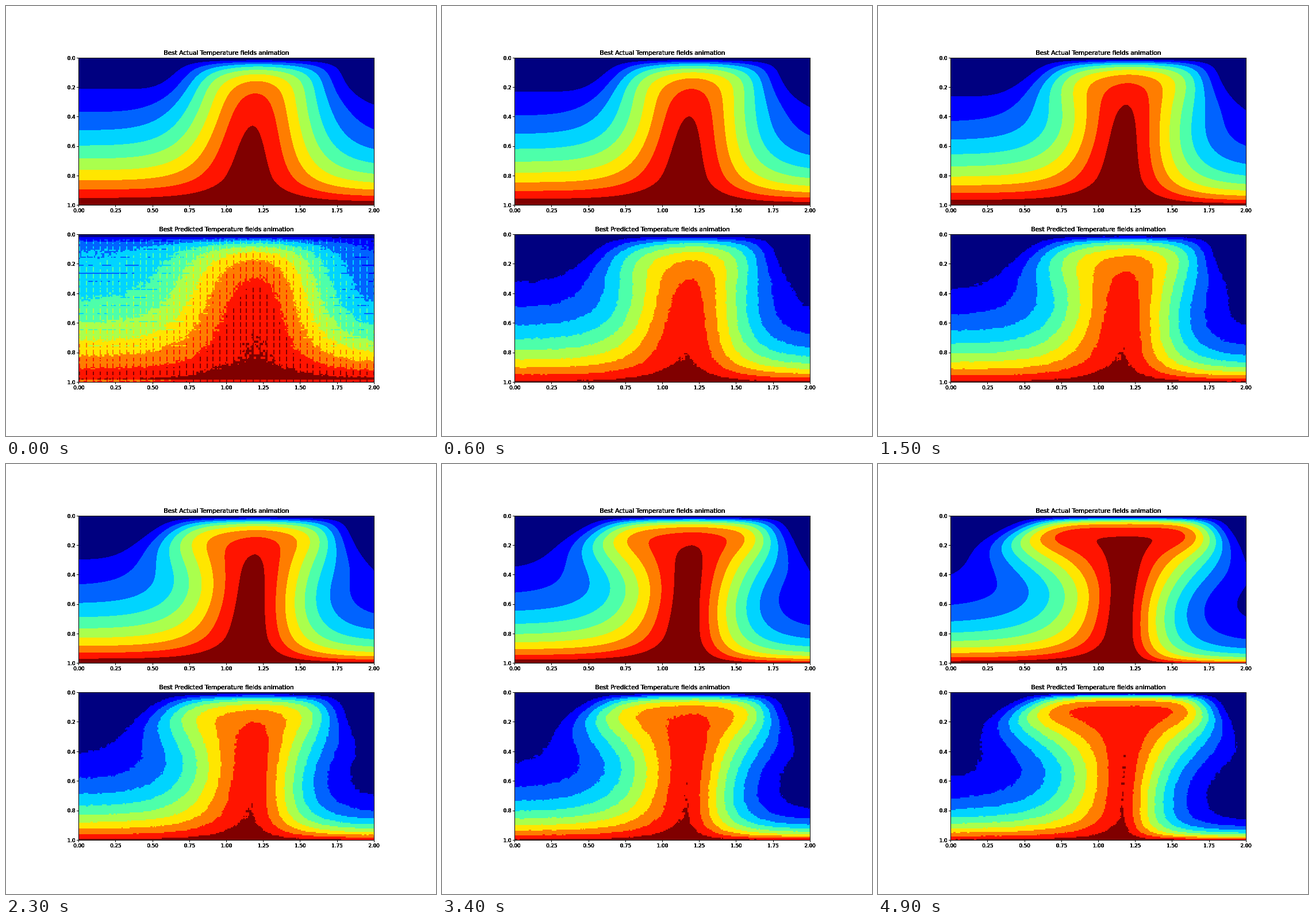
Animation of 748 by 748 pixels, one loop 5000 ms. Source, as an HTML page with a canvas:

```html
<!DOCTYPE html>
<html lang="en">
<head>
<meta charset="utf-8">
<title>Temperature fields</title>
<style>
html, body { margin: 0; width: 100%; height: 100%; overflow: hidden; background: #fff; }
canvas { display: block; }
</style>
</head>
<body>
<canvas id="stage" width="748" height="748"></canvas>
<script>
const LOOP = 5000, STEP = 100, LAST = LOOP - STEP;
const LEFT = 126.5, WIDTH = 514, UNIT = 256.7;
const COLORS = ['#000080', '#0000ff', '#0063ff', '#00d4ff', '#4dffaa',
  '#aaff4d', '#ffe600', '#ff7d00', '#ff1400', '#800000'];
const RGB = COLORS.map(c => [1, 3, 5].map(i => parseInt(c.slice(i, i + 2), 16)));

const ctx = document.getElementById('stage').getContext('2d');

// Pairs give the value at the start and at the end of the loop:
// skin and rise shape the plume axis, decay and bend the two side walls,
// width, flare and spread the mushroom outline.
const actual = {
  title: 'Best Actual Temperature fields animation',
  y: 90.5, h: 256, cell: 1, hot: 1, cap: () => 1,
  skin: [.078, .029], rise: [1.24, 1.42],
  left: { decay: [1.6, 3.4], bend: [1, .86], width: [.413, .413], flare: [.02, .4], spread: .22 },
  right: { decay: [2.9, 5.36], bend: [.95, .64], width: [.456, .33], flare: [0, .29], spread: .28 }
};
const predicted = {
  title: 'Best Predicted Temperature fields animation',
  y: 397.5, h: 257, cell: 2, hot: .92, cap: s => .9 + .062 * Math.exp(-2.45 * s),
  skin: [.084, .026], rise: [1.15, 1.6],
  left: { decay: [2.24, 5.5], bend: [1, 1], width: [.43, .42], flare: [.09, .37], spread: .22 },
  right: { decay: [4.12, 17], bend: [1, 1], width: [.425, .31], flare: [.02, .27], spread: .28 }
};

for (const p of [actual, predicted]) {
  p.grid = document.createElement('canvas');
  p.grid.width = Math.ceil((WIDTH - 1) / p.cell);
  p.grid.height = Math.floor(p.h / p.cell);
}

const lerp = ([a, b], s) => a + (b - a) * s;
const mix = ([a, b], s) => a * (b / a) ** s;
const bump = (y, mid, w) => Math.exp(-(((y - mid) / w) ** 2));

// Wall temperature at height z: 1 at the floor, 0 at the top
function wall(z, a, b) {
  const end = Math.exp(-a);
  return (Math.exp(-a * z ** b) - end) / (1 - end);
}

// Temperature along the plume axis, with a hot foot
function axis(y, skin, rise, cap) {
  const o = (y / skin) ** rise;
  return cap * o / (1 + o) + 2 * Math.max(0, y - .8) ** 2;
}

// One row of the plume at depth y, as a function of x
function plumeRow(p, s, y) {
  const z = 1 - y, center = 1.158 + .062 * z * z;
  const mid = axis(y, mix(p.skin, s), mix(p.rise, s), p.cap(s));
  const soft = 1.9 - .5 * s;
  const steep = bump(y, .1, .16) * (.3 + .7 * s);
  const [left, right] = [p.left, p.right].map(k => ({
    edge: p.hot * wall(z, mix(k.decay, s), mix(k.bend, s)),
    w: mix(k.width, s) + lerp(k.flare, s) * bump(y, .19, k.spread)
  }));
  return x => {
    const { edge, w } = x < center ? left : right;
    const u = Math.abs(x - center) / w;
    return edge + (mid - edge) * Math.exp(-(1 - steep) * u ** soft - steep * u ** 5);
  };
}

function hash(a, b) {
  const v = Math.sin(a * 127.1 + b * 311.7) * 43758.5453;
  return v - Math.floor(v);
}

// Raw first guess: a broad plume under a woven texture
function roughRow(y, j) {
  const skin = 1 - Math.exp(-y / .035);
  const left = .3 * skin + .62 * y ** 2.2;
  const right = .19 * skin + .78 * y ** 3;
  const mid = axis(y, .075, 1.25, .95);
  const rim = y > .985 ? .12 : 0;
  return (x, i) => {
    const edge = x < 1.2 ? left : right;
    const g = bump(x, 1.2, x < 1.2 ? .5 : .47);
    let v = edge + (mid - edge) * g - rim + (hash(i >> 1, j >> 1) - .5) * .025;
    if (i % 5.8 < 1 && (j + 2) % 6 < 4 && y > .02) v += .075;
    if (j % 7 === 5 && hash(i >> 2, j) < .6 && y < .8) v -= .06 * (1 - g);
    return v;
  };
}

function drawField(p, t) {
  const { width, height } = p.grid;
  const gctx = p.grid.getContext('2d');
  const img = gctx.createImageData(width, height);
  const jagged = p === predicted;
  const rough = jagged && t < 500 ? Math.exp(-t / 90) : 0;
  let o = 0;
  for (let j = 0; j < height; j++) {
    const y = (j + .5) / height;
    const row = plumeRow(p, t / LAST, y);
    const first = rough && roughRow(y, j);
    for (let i = 0; i < width; i++, o += 4) {
      const x = (i + .5) * p.cell / UNIT;
      let v = row(x);
      if (jagged) v += (hash(i >> 2, j >> 1) + hash(i >> 1, j >> 2) - 1) * .007;
      if (rough) v += rough * (first(x, i) - v);
      const c = RGB[Math.max(0, Math.min(9, Math.floor(v * 10)))];
      img.data[o] = c[0];
      img.data[o + 1] = c[1];
      img.data[o + 2] = c[2];
      img.data[o + 3] = 255;
    }
  }
  gctx.putImageData(img, 0, 0);
  ctx.imageSmoothingEnabled = false;
  ctx.drawImage(p.grid, LEFT + .5, p.y + .5, width * p.cell, height * p.cell);
}

// Repeated drawing gives the heavy edges of overprinted text
function label(text, x, y, size, align) {
  ctx.font = `${size}px "DejaVu Sans", sans-serif`;
  ctx.textAlign = align;
  for (let i = 0; i < 6; i++) ctx.fillText(text, x, y);
}

function drawAxes({ title, y, h }) {
  const bottom = y + h;
  ctx.fillStyle = ctx.strokeStyle = '#000';
  ctx.lineWidth = 1;
  ctx.strokeRect(LEFT, y, WIDTH, h);
  ctx.beginPath();
  for (let i = 0; i <= 8; i++) {
    const x = LEFT + .3 + i * UNIT / 4;
    ctx.moveTo(Math.floor(x) + .5, bottom);
    ctx.lineTo(Math.floor(x) + .5, bottom + 3.5);
    label((i / 4).toFixed(2), x, bottom + 12.7, 8.7, 'center');
  }
  for (let i = 0; i <= 5; i++) {
    const ty = y + i * h / 5;
    ctx.moveTo(LEFT - 3.5, Math.floor(ty) + .5);
    ctx.lineTo(LEFT, Math.floor(ty) + .5);
    label((i / 5).toFixed(1), LEFT - 6, ty + 3.2, 8.7, 'right');
  }
  ctx.stroke();
  label(title, 383.4, y - 5.5, 10.55, 'center');
}

function render(t) {
  ctx.fillStyle = '#fff';
  ctx.fillRect(0, 0, 748, 748);
  for (const p of [actual, predicted]) {
    drawField(p, t);
    drawAxes(p);
  }
}

let shown = -1;
const start = performance.now();
function tick() {
  const t = Math.floor((performance.now() - start) % LOOP / STEP) * STEP;
  if (t !== shown) render(shown = t);
  requestAnimationFrame(tick);
}
tick();
</script>
</body>
</html>
```
